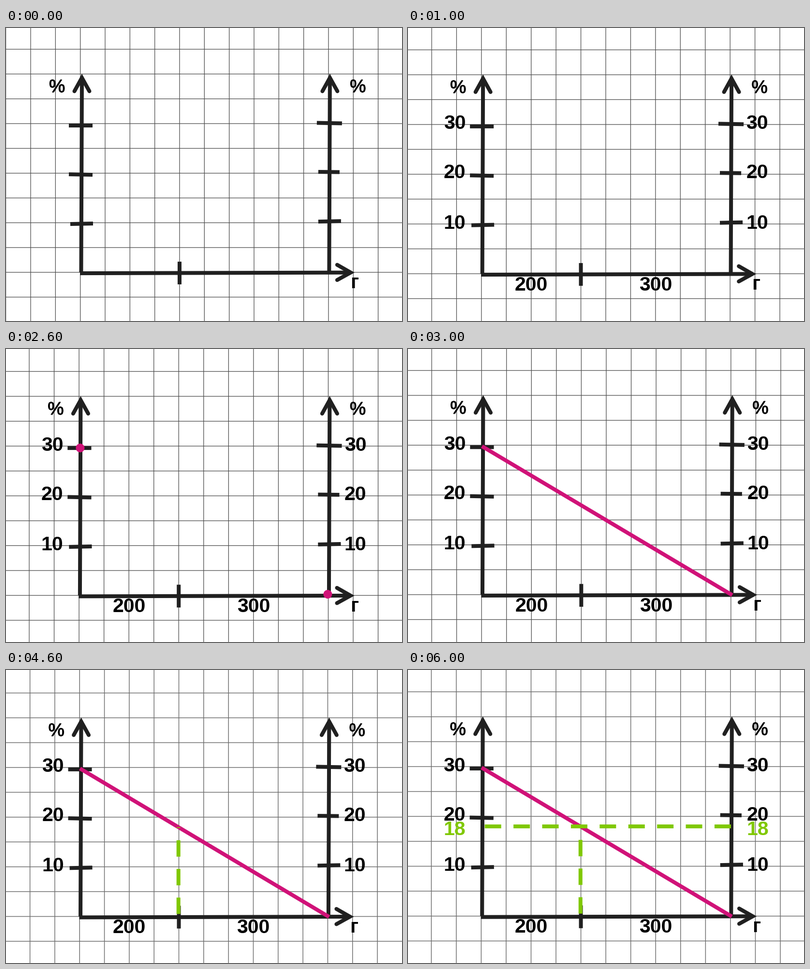
A matplotlib script for the animation above (7000 ms loop, 819 by 607 pixels).

```python
import numpy as np
import matplotlib.pyplot as plt
from matplotlib.animation import FuncAnimation
from matplotlib.patches import Circle
from matplotlib.patheffects import withStroke

W, H, DPI = 819, 607, 64
PT = 72 / DPI  # points per pixel
INK, PINK, GREEN = "#202020", "#d01278", "#80c800"
CELL = 51.34

# Camera per step: first grid line and grid spacing, for x and y
VIEWS = [
    (51.0, 51.33, 44.0, 51.35),
    (49.0, 51.43, 45.3, 51.53),
    (48.0, 51.54, 46.5, 51.55),
    (49.0, 51.57, 44.5, 51.60),
    (49.6, 51.32, 47.6, 51.44),
    (47.0, 51.50, 45.6, 51.60),
    (48.3, 51.55, 45.2, 51.62),
]

fig = plt.figure(figsize=(W / DPI, H / DPI), dpi=DPI, facecolor="white")
ax = fig.add_axes([0, 0, 1, 1])


class Board:
    """Draws in board coordinates through one camera view."""

    def __init__(self, view):
        self.x0, self.dx, self.y0, self.dy = view

    def at(self, x, y):
        return (self.x0 + (x - 51) * self.dx / CELL,
                self.y0 + (y - 44) * self.dy / CELL)

    def line(self, *points, color=INK, width=8, **style):
        xs, ys = zip(*(self.at(*p) for p in points))
        style.setdefault("solid_capstyle", "butt")
        ax.plot(xs, ys, color=color, lw=width * PT, snap=False, **style)

    def dashes(self, *points):
        self.line(*points, color=GREEN, dash_capstyle="butt",
                  linestyle=(0, (34 / 8, 25.4 / 8)))

    def head(self, *points):
        self.line(*points, solid_capstyle="round", solid_joinstyle="miter")

    def dot(self, x, y):
        ax.add_patch(Circle(self.at(x, y), 9, color=PINK, lw=0, zorder=3))

    def text(self, x, y, s, size=41, color="black", weight="bold", **style):
        ax.text(*self.at(x, y), s, color=color, weight=weight,
                family="Liberation Sans", size=size * PT,
                ha="center", va="baseline", zorder=4, **style)

    def grid(self, shade, width):
        style = dict(color=shade, lw=width * PT, snap=False)
        for x in np.arange(self.x0 - self.dx, W, self.dx):
            ax.plot([x, x], [-1, H + 1], **style)
        for y in np.arange(self.y0, H, self.dy):
            ax.plot([-1, W + 1], [y, y], **style)


def draw_axes(b):
    b.line((155.5, 506), (157, 106))
    b.line((668.5, 506), (670, 106))
    b.line((153, 508), (714, 506.5))
    for x in (157, 670):
        b.head((x - 15.5, 131), (x, 103), (x + 15.5, 131))
    b.head((685, 490.5), (713, 506.5), (685, 522))

    b.line((130, 202), (179, 202))
    b.line((130, 303), (179, 304))
    b.line((133, 406), (180, 405))
    b.line((643, 196.5), (695, 197.5))
    b.line((646, 298), (690, 298.5))
    b.line((646, 401), (693, 400))
    b.line((359, 484), (359, 531))

    outline = [withStroke(linewidth=1.1 * PT, foreground="black")]
    for x in (105.7, 728):
        b.text(x, 133, "%", size=37.5, weight="normal", path_effects=outline)
    b.text(721, 539, "г")


def draw_numbers(b):
    for value, y in ((30, 207.5), (20, 309), (10, 413)):
        for x in (98.4, 722.9):
            b.text(x, y, str(value))
    b.text(256.6, 540.5, "200")
    b.text(513, 540.5, "300")


def draw(step):
    ax.clear()
    ax.set_axis_off()
    ax.set_xlim(0, W)
    ax.set_ylim(H, 0)

    b = Board(VIEWS[step])
    b.grid(*(("#505050", 1.3) if step < 4 else ("#707070", 1.5)))
    draw_axes(b)
    if step >= 1:
        draw_numbers(b)
    if step == 2:
        b.dot(156, 201.9)
        b.dot(666, 503.7)
    if step >= 3:
        b.line((154.5, 200.2), (669.8, 507), color=PINK)
    if step >= 4:
        b.dashes((358.2, 501), (358.2, 321.5))
    if step == 5:
        b.dashes((160, 321.5), (667.5, 325))
    if step == 6:
        b.dashes((161, 321.3), (669, 321.3))
        for x in (98.4, 722.9):
            b.text(x, 338.9, "18", color=GREEN)
    return []


anim = FuncAnimation(fig, draw, frames=len(VIEWS), init_func=lambda: [],
                     interval=1000, repeat=True, repeat_delay=0, blit=False)
plt.show()
```
